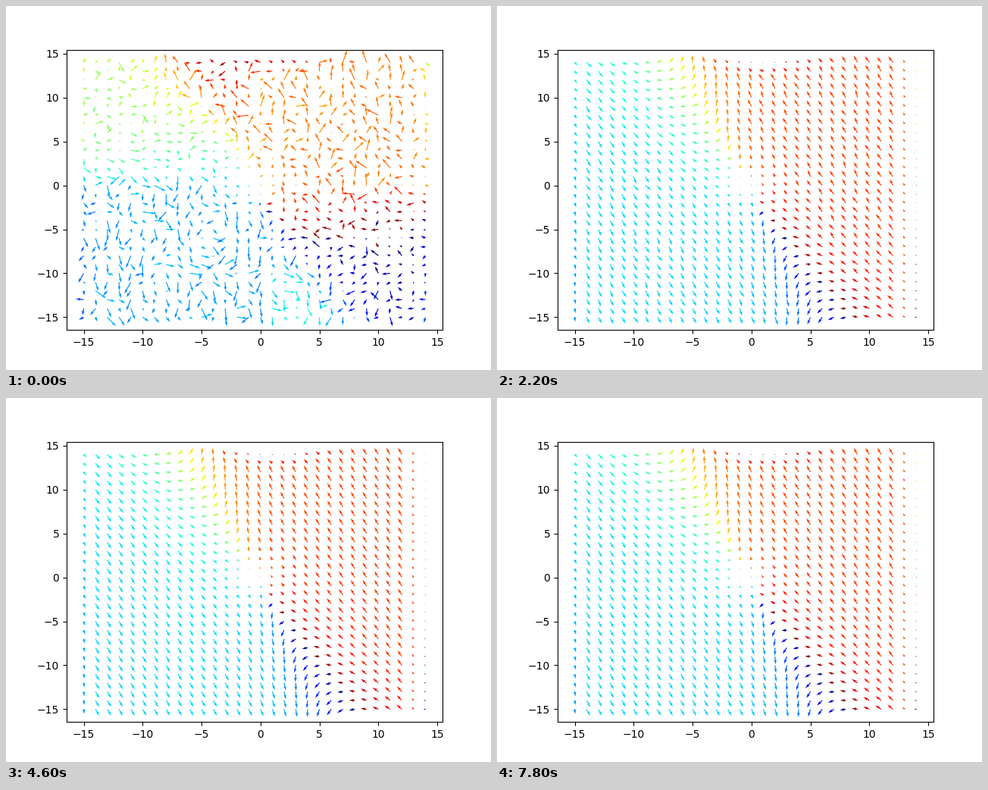
A matplotlib script that plays this animation: 640 px wide and 480 px high, repeating every 8000 ms.

```python
import numpy as np
import matplotlib.pyplot as plt
from matplotlib.animation import FuncAnimation

FRAMES, STEP = 40, 200

X, Y = np.meshgrid(np.arange(-15, 15), np.arange(-15, 15))
S = Y / 15


def settled_angle():
    """Two opposed flows that turn into each other around a saddle point."""
    u = -5.6 * np.tanh((X + 0.27 * Y + 0.2) / 4.5)
    v = 9.5 * np.tanh((X + 0.6 * Y + 0.5) / 6.5)
    return np.arctan2(v, u)


def edge_gain():
    """Arrows are weaker in the outer columns and in a dip at the top."""
    gain = 1 - 0.85 * TOP
    gain[:, 0] *= 0.6
    gain[:, -2] *= 0.42
    gain[:, -1] = 0.08 + 0.3 * np.clip(-S[:, -1], 0, 1)
    return gain


TOP = np.clip(0.5 * (Y - 12), 0, 1) ** 1.2 * np.exp(-((X - 1) / 4) ** 2)
ANGLE = settled_angle() + 0.9 * TOP
ANGLE[:, 0] += 0.25 * (S[:, 0] - 0.6)
ANGLE[:, -1] -= S[:, -1]
GAIN = edge_gain()
CORE = np.tanh(np.hypot(X + 0.5, Y - 0.2) / 3.5)

# early twist, strongest in the top left and bottom right quarters
TWIST = 1.5 * np.tanh(np.clip(-X * Y, 0, None) / 40) - 0.35


def field(k):
    fade = np.exp(-k / 2.5)
    heat = np.exp(-k / 5)
    rng = np.random.default_rng(100 + k)
    jitter = 0.75 * heat * rng.standard_normal(X.shape)
    swell = np.clip(1 + 0.4 * heat * rng.standard_normal(X.shape), 0.1, 1.7)

    smooth = ANGLE + fade * TWIST
    angle = smooth + jitter
    gain = GAIN + 0.5 * fade * (1 - GAIN)
    size = (7 + 3.5 * np.abs(np.sin(smooth))) * CORE * gain * swell

    hue = (smooth + 0.15 * jitter + np.pi) % (2 * np.pi) - np.pi
    return size * np.cos(angle), size * np.sin(angle), hue


fig, ax = plt.subplots(figsize=(6.4, 4.8), dpi=100)
arrows = ax.quiver(X, Y, *field(0), cmap="jet", scale=1, scale_units="dots")
arrows.set_clim(-np.pi, np.pi)
ax.set_xlim(-16.45, 15.45)
ax.set_ylim(-16.45, 15.45)


def draw(k):
    arrows.set_UVC(*field(k))
    return (arrows,)


anim = FuncAnimation(fig, draw, frames=FRAMES, interval=STEP, repeat=True,
                     repeat_delay=0)
plt.show()
```
